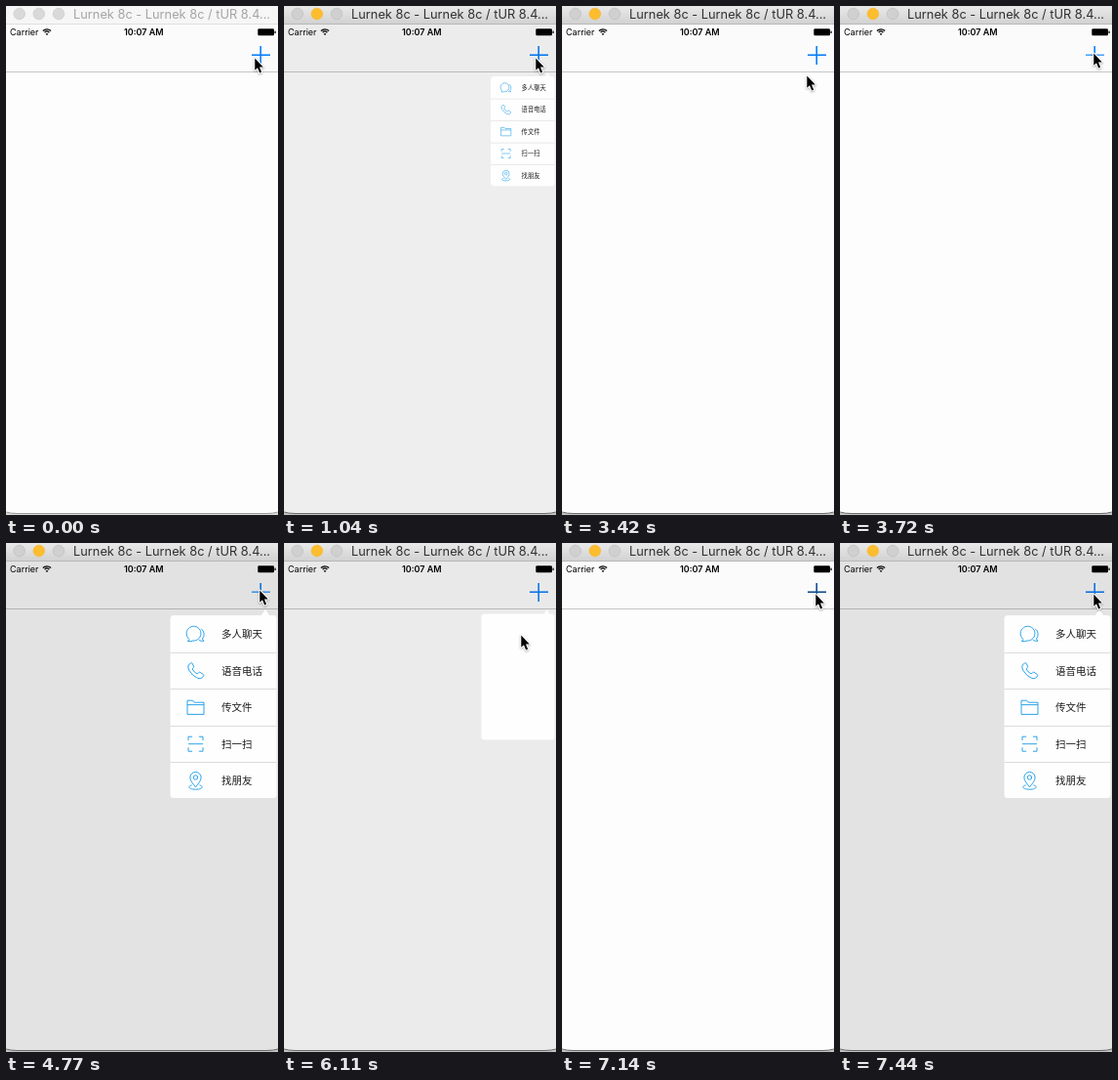
An HTML page with a canvas that plays this animation: 279x521 px, repeating every 8000 ms.

```html
<!DOCTYPE html>
<html lang="zh-CN">
<head>
<meta charset="utf-8">
<title>Popover menu</title>
<style>
html, body { margin: 0; width: 100%; height: 100%; overflow: hidden; background: #fdfdfd; }
canvas { display: block; width: 279px; height: 521px; }
</style>
</head>
<body>
<canvas id="stage"></canvas>
<script>
const W = 279, H = 521, LOOP = 8000;
const UI = 'Inter, "Open Sans", sans-serif';
const CJK = '"Noto Sans CJK SC", "Noto Sans CJK JP", "Noto Sans CJK", sans-serif';
const PLUS = { normal: '#0a7ffb', faded: '#4fa6f5', pressed: '#124f90' };

const canvas = document.getElementById('stage');
const ctx = canvas.getContext('2d');
const ratio = window.devicePixelRatio || 1;
canvas.width = Math.round(W * ratio);
canvas.height = Math.round(H * ratio);

// Each step lists only what changes; the rest carries over.
const steps = [
  { t: 0, x: 254, y: 52, open: 0, rows: true, plus: 'normal', active: false },
  { t: 150, x: 257 },
  { t: 750, active: true },
  { t: 890, plus: 'pressed' },
  { t: 1040, open: 0.6, plus: 'normal' },
  { t: 1190, open: 1 },
  { t: 2230, x: 243, y: 82 },
  { t: 2380, x: 240, y: 97 },
  { t: 2530, x: 238, y: 105 },
  { t: 2970, open: 0.69, rows: false },
  { t: 3120, open: 0 },
  { t: 3270, x: 242, y: 95 },
  { t: 3420, x: 250, y: 70 },
  { t: 3570, x: 257, y: 52 },
  { t: 3720, x: 259, y: 47, plus: 'faded' },
  { t: 4770, open: 1, rows: true },
  { t: 5070, x: 255, y: 58, plus: 'normal' },
  { t: 5220, x: 249, y: 73 },
  { t: 5370, x: 245, y: 86 },
  { t: 5510, x: 243, y: 92 },
  { t: 5660, x: 242, y: 93 },
  { t: 6110, open: 0.69, rows: false },
  { t: 6260, open: 0 },
  { t: 6560, x: 245, y: 84 },
  { t: 6700, x: 252, y: 65 },
  { t: 6850, x: 258, y: 54 },
  { t: 7000, x: 259, y: 51 },
  { t: 7140, plus: 'pressed' },
  { t: 7290, open: 0.6, rows: true, plus: 'normal' },
  { t: 7440, open: 1 }
];

function stateAt(time) {
  return Object.assign({}, ...steps.filter(s => s.t <= time));
}

function rect(x, y, w, h, color) {
  ctx.fillStyle = color;
  ctx.fillRect(x, y, w, h);
}

function text(str, x, y, font, color) {
  ctx.font = font;
  ctx.fillStyle = color;
  ctx.fillText(str, x, y);
}

function stroke(d, color, width) {
  ctx.strokeStyle = color;
  ctx.lineWidth = width;
  ctx.stroke(new Path2D(d));
}

function drawTitleBar(active) {
  const bar = ctx.createLinearGradient(0, 0, 0, 18);
  bar.addColorStop(0, active ? '#e9e9e9' : '#f6f6f6');
  bar.addColorStop(1, active ? '#d2d2d2' : '#f6f6f6');
  rect(0, 0, W, 18, bar);
  rect(0, 18, W, 1, active ? '#b8b8b8' : '#dedede');
  [13.7, 33.8, 54].forEach((x, i) => {
    const lit = active && i === 1;
    ctx.beginPath();
    ctx.arc(x, 8, 5.8, 0, 7);
    ctx.fillStyle = lit ? '#fdbd2e' : active ? '#d0d0d0' : '#d9d9d9';
    ctx.fill();
    ctx.strokeStyle = lit ? '#f6b62c' : active ? '#bdbdbd' : '#cbcbcb';
    ctx.lineWidth = 0.7;
    ctx.stroke();
  });
  text('Lurnek 8c - Lurnek 8c / tUR 8.4...', 69, 13, '12.8px ' + UI, active ? '#303030' : '#a4a4a4');
}

function drawStatusBar() {
  text('Carrier', 4, 30, '9px ' + UI, '#000');
  text('10:07 AM', 121, 30, '600 9px ' + UI, '#000');
  ctx.strokeStyle = '#000';
  ctx.lineWidth = 1.3;
  [5.6, 3.3].forEach(r => {
    ctx.beginPath();
    ctx.arc(42, 29.4, r, -Math.PI * 0.76, -Math.PI * 0.24);
    ctx.stroke();
  });
  ctx.fillStyle = '#000';
  ctx.beginPath();
  ctx.moveTo(42, 29.9);
  ctx.arc(42, 29.9, 1.9, -Math.PI * 0.76, -Math.PI * 0.24);
  ctx.fill();
  ctx.beginPath();
  ctx.roundRect(258.3, 23.2, 16.7, 7, 1.3);
  ctx.fill();
  rect(275.5, 25.6, 1.2, 2.4, '#000');
}

function drawScreen(s) {
  rect(0, 19, W, 500, '#fdfdfd');
  rect(0, 19, W, 48, '#fbfbfb');
  rect(0, 67, W, 1, '#c6c6c6');
  drawStatusBar();
  stroke('M252 50.2H271', PLUS[s.plus], 1.6);
  stroke('M261.2 41V60', PLUS[s.plus === 'faded' ? 'normal' : s.plus], 1.6);
  rect(0, 19, W, 500, `rgba(0,0,0,${0.1 * s.open})`);
  rect(0, 519, W, 2, s.active ? '#c4c4c4' : '#dadada');
  stroke('M0 518Q5 519.5 12 519.5H267Q274 519.5 279 518', s.active ? '#6a6a6a' : '#9a9a9a', 1);
}

// Icons are drawn around their own centre.
const menu = [
  ['多人聊天', 'M-6.6 5.2A7.4 7.4 0 1 1 -2.6 6.8Q-5 8 -8.2 7.2Q-6.8 6.4 -6.6 5.2Z M5.7 -5.4A7 7 0 0 1 7 4.8Q7.3 6.4 8.6 7Q5.6 7.6 3.6 6.2'],
  ['语音电话', 'M-4.8 -7.8L-7.2 -6Q-8.6 -4 -6.8 -.6Q-3.6 5.2 2 7.6Q5 8.8 6.6 7.2L8.2 5.2Q8.6 4.4 7.8 3.8L4.6 1.6Q3.8 1.2 3.1 1.9L1.7 3.3Q-1.8 1.6 -3.4 -1.8L-2.2 -3.2Q-1.6 -3.9 -2 -4.7L-3.5 -7.6Q-4 -8.2 -4.8 -7.8Z'],
  ['传文件', 'M-8.5 -7H-2.8L-1.2 -5H8.5V7.2H-8.5Z M-8.5 -2.6H8.5'],
  ['扫一扫', 'M-7.5 -3.6V-7.5H-3.4 M3.4 -7.5H7.5V-3.6 M7.5 3.6V7.5H3.4 M-3.4 7.5H-7.5V3.6 M-7.5 0H7.5'],
  ['找朋友', 'M0 6.6C-3 2.8 -5.6 .2 -5.6 -3.2A5.6 5.6 0 0 1 5.6 -3.2C5.6 .2 3 2.8 0 6.6Z M-2.2 -3.2A2.2 2.2 0 1 1 2.2 -3.2A2.2 2.2 0 1 1 -2.2 -3.2Z M-4 4.6C-8.6 6 -7.2 9 0 9C7.2 9 8.6 6 4 4.6']
];

function drawPopover(s) {
  if (!s.open) return;
  ctx.save();
  ctx.translate(277.5, 69);
  ctx.scale(s.open, s.open);
  ctx.translate(-277.5, -69);
  ctx.fillStyle = '#fefefe';
  ctx.beginPath();
  ctx.roundRect(168.5, 74, 109, 187, 3.5 / s.open);
  ctx.fill();
  ctx.fill(new Path2D('M261.5 74.5L266 68L270.5 74.5Z'));
  if (s.rows) menu.forEach(drawRow);
  ctx.restore();
}

function drawRow([label, icon], i) {
  const mid = 93 + 37.5 * i;
  if (i) rect(168.5, Math.round(mid - 19), 109, 1, '#dcdcdc');
  ctx.save();
  ctx.translate(194.5, mid + 0.2);
  stroke(icon, '#2ba3ea', 1);
  ctx.restore();
  text(label, 221, mid + 4, '10.5px ' + CJK, '#1c1c1c');
}

const arrow = new Path2D('M1.3 1.6V13.8L4 11.3L6.2 16.6L8.2 15.7L6 10.5H9.8Z');

function drawCursor(x, y) {
  ctx.save();
  ctx.translate(x, y);
  ctx.lineJoin = 'round';
  ctx.strokeStyle = '#fff';
  ctx.lineWidth = 2.2;
  ctx.shadowColor = 'rgba(0,0,0,0.35)';
  ctx.shadowBlur = 2 * ratio;
  ctx.shadowOffsetY = 0.7 * ratio;
  ctx.stroke(arrow);
  ctx.shadowColor = 'transparent';
  ctx.fillStyle = '#000';
  ctx.fill(arrow);
  ctx.restore();
}

const start = performance.now();

function draw() {
  const s = stateAt((performance.now() - start) % LOOP);
  ctx.setTransform(ratio, 0, 0, ratio, 0, 0);
  drawTitleBar(s.active);
  drawScreen(s);
  drawPopover(s);
  drawCursor(s.x, s.y);
  requestAnimationFrame(draw);
}
draw();
</script>
</body>
</html>
```
